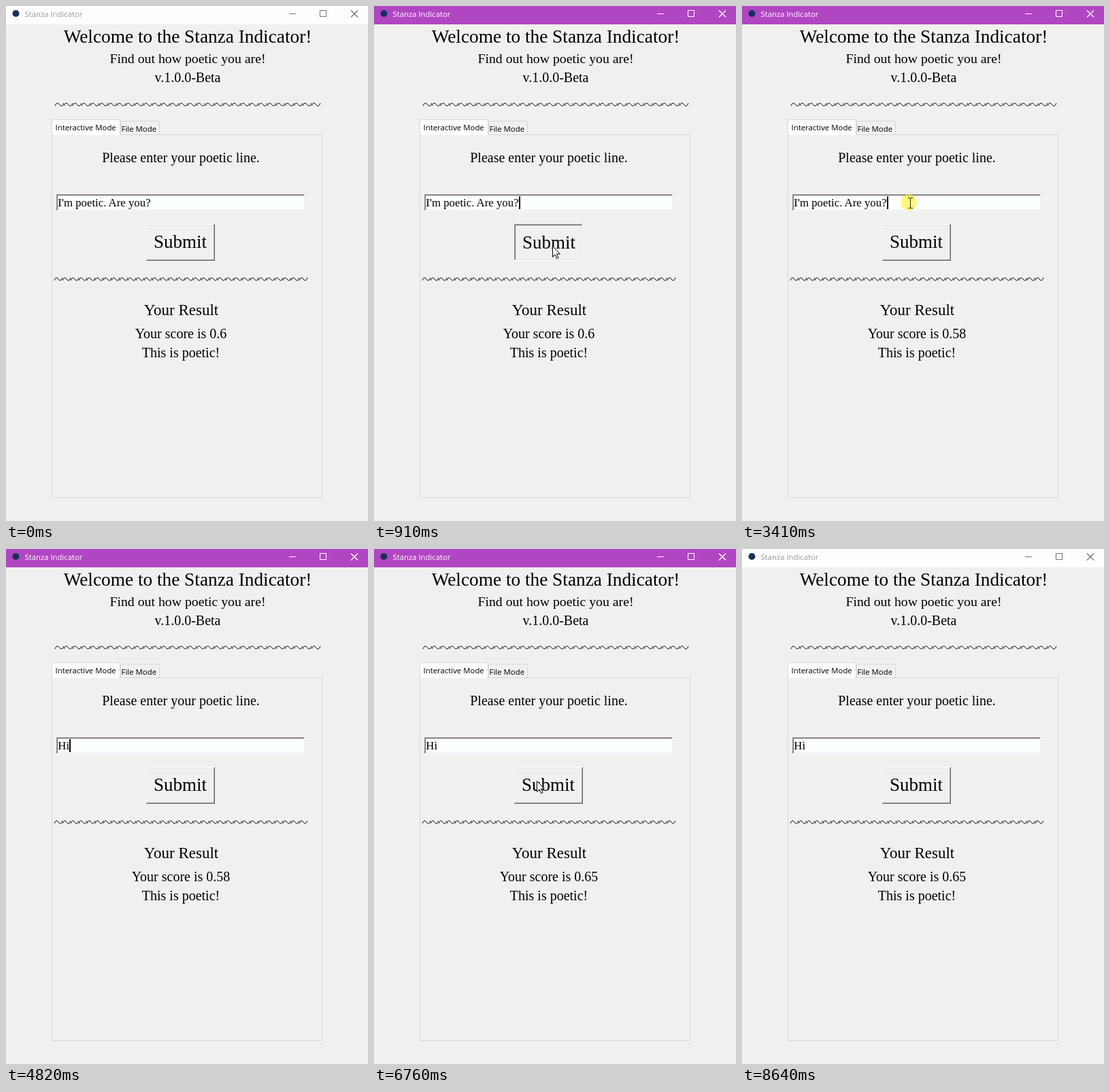
An HTML page that plays this animation: 532 by 758 pixels, repeating every 8720 ms.

```html
<!DOCTYPE html>
<html lang="en">
<head>
<meta charset="utf-8">
<title>Stanza Indicator</title>
<style>
  html, body { margin: 0; width: 100%; height: 100%; overflow: hidden; background: #f0f0ee; }
  svg { display: block; width: 532px; height: 758px; }
  text { font-family: "Liberation Serif", "Times New Roman", serif; font-size: 20px; fill: #000; white-space: pre; }
  .ui { font-family: "Open Sans", "Noto Sans", sans-serif; font-size: 11.4px; }
  .mid { text-anchor: middle; }
  .box { shape-rendering: crispEdges; }
  .line { fill: none; stroke-width: 1; }
</style>
</head>
<body>
<svg viewBox="0 0 532 758">
  <rect width="532" height="758" fill="#f0f0ee"/>

  <rect id="bar" class="box" width="532" height="27"/>
  <circle cx="14.5" cy="11" r="5" fill="#16305c"/>
  <text id="title" class="ui" x="27.5" y="16" style="font-size:11.3px">Stanza Indicator</text>
  <g id="controls" class="line">
    <path class="box" d="M416 11.5H426M461.5 6.5H470.5V15.5H461.5Z"/>
    <path d="M507 6.5L517 16.5M517 6.5L507 16.5" stroke-width="1.4"/>
  </g>

  <text class="mid" x="267" y="54" style="font-size:27.3px">Welcome to the Stanza Indicator!</text>
  <text class="mid" x="267" y="84" style="font-size:19.8px">Find out how poetic you are!</text>
  <text class="mid" x="267" y="112">v.1.0.0-Beta</text>
  <path id="wave1" class="line" stroke="#000"/>

  <g class="box" stroke="#d9d9d9">
    <rect x="67.5" y="189.5" width="397" height="534" fill="none"/>
    <rect x="168.5" y="169.5" width="57" height="20" fill="#f0f0ee"/>
    <path d="M67.5 190V167.5H167.5V190" fill="#fff"/>
    <path d="M68 189.5H167" stroke="#fff"/>
  </g>
  <text class="ui" x="72.5" y="183">Interactive Mode</text>
  <text class="ui" x="169.5" y="185">File Mode</text>

  <text class="mid" x="257" y="230">Please enter your poetic line.</text>

  <rect class="box" x="76" y="279" width="362" height="21" fill="#fcffff"/>
  <g id="field" class="box line"></g>
  <rect id="sel" class="box" x="77" y="280" width="137" height="19" fill="#0078d7"/>
  <text id="entry" x="76.3" y="295" style="font-size:16.8px"></text>
  <rect id="caret" class="box" y="280" width="2" height="19"/>

  <g id="button" class="box line"></g>
  <text id="submit" class="mid" x="256" y="356" style="font-size:27px">Submit</text>

  <path id="wave2" class="line" stroke="#000"/>
  <text class="mid" x="257.5" y="455" style="font-size:23px">Your Result</text>
  <text id="score" class="mid" x="257" y="489"></text>
  <text class="mid" x="257" y="517">This is poetic!</text>

  <circle id="glow" r="12" fill="#fff700" fill-opacity=".52"/>
  <path id="arrow" d="M.5 .5V16.3L4.1 13 6.6 18.6 9 17.6 6.5 12H11.3Z" fill="#fff" stroke="#000"/>
  <path id="beam" class="line box" d="M-3 -7.5H0M1 -7.5H4M.5 -7V7M-3 7.5H0M1 7.5H4" stroke="#222"/>
</svg>
<script>
const LOOP = 8720;
const $ = id => document.getElementById(id);
const set = (id, attrs) => { for (const k in attrs) $(id).setAttribute(k, attrs[k]); };
const show = (id, on) => set(id, { visibility: on ? 'visible' : 'hidden' });

// Last row whose time has been reached.
const at = (rows, t) => rows.filter(r => r[0] <= t).pop()[1];

const line = "I'm poetic. Are you?";
const entry = [[0, line], [4190, ''], [4590, 'H'], [4820, 'Hi']];
const caret = [[0, 0], [760, 213], [1780, 0], [2010, 213], [2640, 0], [2962, 213],
  [3490, 76], [3890, 0], [4510, 76], [4590, 0], [4740, 89], [4820, 93],
  [5370, 0], [5670, 93], [6760, 0], [6990, 93], [7620, 0], [7920, 93], [8570, 0]];
const score = [[0, '0.6'], [1780, '0.58'], [6760, '0.65']];
const active = [[0, false], [760, true], [8640, false]];
const pressed = [[0, false], [760, true], [1690, false], [5910, true], [6760, false]];
const glow = [[0, false], [760, true], [910, false], [3330, true], [3570, false],
  [5910, true], [6060, false]];

// Pointer moves: start, end, from, to; the pointer rests until the next row or until it hides.
const moves = [
  [70, 680, [400, 697], [262, 353]],
  [2810, 3330, [262, 353], [247, 290]],
  [3414, 3490, [247, 290], [73, 290]],
  [5446, 5750, [130, 310], [239, 341]],
  [7300, 7450, [239, 341], [246, 359]],
  [7690, 8320, [246, 359], [514, 742]]
];
const hidden = [[0, true], [70, false], [3570, true], [5446, false], [8400, true]];
const TICK = 76;
const ease = p => p * p * (3 - 2 * p);

function pointer(t) {
  const m = moves.filter(r => r[0] <= t).pop();
  if (!m || at(hidden, t)) return null;
  const [start, end, a, b] = m;
  const q = Math.floor((t - start) / TICK) * TICK;
  const p = t >= end ? 1 : ease(Math.min(1, q / (end - start)));
  return a.map((v, i) => Math.round(v + (b[i] - v) * p));
}

// Two-pixel bevel: outer and inner line, upper left and lower right.
function bevel(id, x, y, w, h, sunken) {
  const [upper, lower] = sunken
    ? [['#a0a0a0', '#696969'], ['#fff', '#e3e3e3']]
    : [['#fff', '#e3e3e3'], ['#696969', '#a0a0a0']];
  $(id).innerHTML = [0, 1].map(i => {
    const l = x + i + .5, t = y + i + .5, r = x + w - i - .5, b = y + h - i - .5;
    return `<path d="M${l} ${b}V${t}H${r}" stroke="${upper[i]}"/>` +
      `<path d="M${l - .5} ${b}H${r}V${t - .5}" stroke="${lower[i]}"/>`;
  }).join('');
}

// Row of n tildes, each w wide.
function wave(id, x, y, n, w) {
  const tilde = i => `M${x + i * w} ${y + 2}q${w * .22} -7 ${w * .5} -2t${w * .5} -2`;
  set(id, { d: Array.from({ length: n }, (_, i) => tilde(i)).join('') });
}

function drawBar(on) {
  set('bar', { fill: on ? '#b146c2' : '#fcfffe' });
  $('title').style.fill = on ? '#fff' : '#999';
  set('controls', { stroke: on ? '#fff' : '#777' });
}

let wasDown = null;
function drawButton(down) {
  if (down === wasDown) return;
  wasDown = down;
  bevel('button', 206, 321, 101, 54, down);
  set('submit', { transform: down ? 'translate(1 1)' : '' });
}

function drawPointer(t) {
  const p = pointer(t);
  const inEntry = p && p[1] > 277 && p[1] < 301 && p[0] < 439;
  show('arrow', p && !inEntry);
  show('beam', inEntry);
  show('glow', p && at(glow, t));
  if (!p) return;
  const [x, y] = p;
  set('arrow', { transform: `translate(${x} ${y})` });
  set('beam', { transform: `translate(${x} ${y})` });
  set('glow', { cx: inEntry ? x - 2 : x, cy: inEntry ? y - 1 : y });
}

function draw(t) {
  drawBar(at(active, t));
  drawButton(at(pressed, t));
  const selected = t >= 3490 && t < 4190;
  show('sel', selected);
  $('entry').style.fill = selected ? '#fff' : '#000';
  $('entry').textContent = at(entry, t);
  const x = at(caret, t);
  show('caret', x);
  set('caret', { x });
  $('score').textContent = 'Your score is ' + at(score, t);
  drawPointer(t);
}

wave('wave1', 72, 145, 30, 13);
wave('wave2', 71, 402, 31, 12);
bevel('field', 74, 277, 366, 25, true);

const begin = performance.now();
function frame() {
  draw((performance.now() - begin) % LOOP);
  requestAnimationFrame(frame);
}
frame();
</script>
</body>
</html>
```
